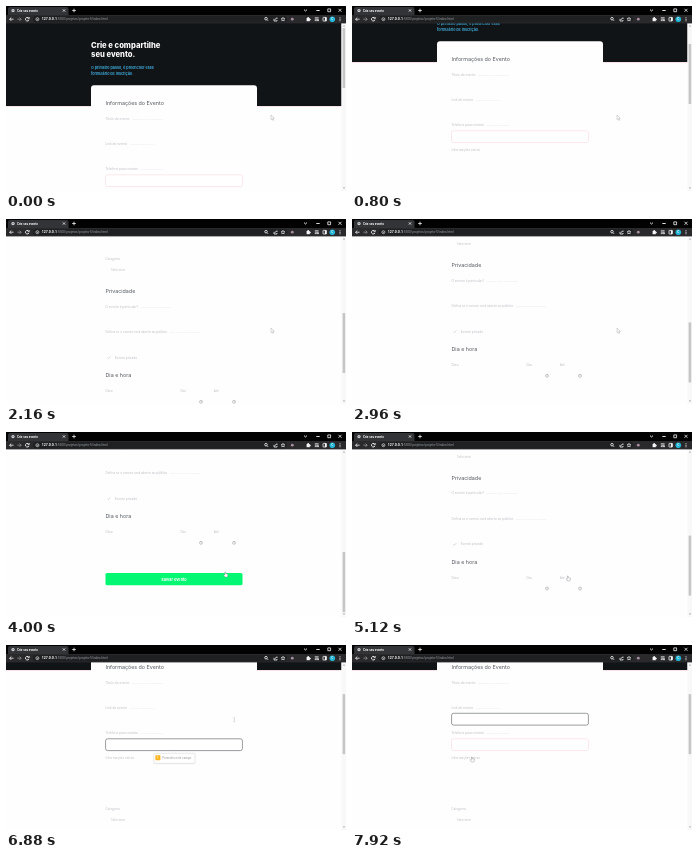
These frames come from a looping animation (340 px wide and 185 px high, 8000 ms). An HTML page with a canvas:

```html
<!DOCTYPE html>
<html lang="pt-BR">
<head>
<meta charset="utf-8">
<title>Crie seu evento</title>
<style>
html, body { margin: 0; width: 100%; height: 100%; overflow: hidden; background: #fff; }
canvas { display: block; width: 340px; height: 185px; }
</style>
</head>
<body>
<canvas id="stage"></canvas>
<script>
const W = 340, H = 185, LOOP = 8000, STEP = 80;
const PAGE_TOP = 17.4, PAGE_RIGHT = 335.5;
const UI = 'Roboto, "Open Sans", sans-serif';
const BODY = '"Open Sans", Inter, sans-serif';
const HEAD = 'Inter, "Open Sans", sans-serif';

const canvas = document.getElementById('stage');
const ctx = canvas.getContext('2d');
const dpr = window.devicePixelRatio || 1;
canvas.width = W * dpr;
canvas.height = H * dpr;

// [time, value...]
const scrollKeys = [
  [480, 0], [800, 44], [1040, 75], [1280, 75], [1600, 106], [2160, 199],
  [2720, 199], [2960, 225], [3360, 271], [4720, 271], [6240, 97.5], [6480, 75]
];
const pointerKeys = [
  [3680, 265, 109], [4000, 218.5, 140], [4480, 215, 144], [5120, 215, 144],
  [5840, 229, 77], [6640, 229, 77], [6960, 228, 74], [7520, 228, 74], [7920, 119, 112]
];

function track(keys, t) {
  if (t <= keys[0][0]) return keys[0].slice(1);
  for (let i = 1; i < keys.length; i++) {
    const a = keys[i - 1], b = keys[i];
    if (t <= b[0]) {
      const k = (t - a[0]) / (b[0] - a[0]);
      return a.slice(1).map((v, j) => v + (b[j + 1] - v) * k);
    }
  }
  return keys[keys.length - 1].slice(1);
}

function rect(x, y, w, h, color) {
  ctx.fillStyle = color;
  ctx.fillRect(x, y, w, h);
}

function round(x, y, w, h, r, fill, stroke, line = 0.7) {
  ctx.beginPath();
  ctx.roundRect(x, y, w, h, r);
  if (fill) { ctx.fillStyle = fill; ctx.fill(); }
  if (stroke) { ctx.strokeStyle = stroke; ctx.lineWidth = line; ctx.stroke(); }
}

// y is the vertical middle of the line; returns the end of the text
function text(str, x, y, size, color, family, weight = 400, align = 'left') {
  ctx.font = `${weight} ${size}px ${family}`;
  ctx.textAlign = align;
  ctx.textBaseline = 'middle';
  ctx.fillStyle = color;
  ctx.fillText(str, x, y);
  return x + ctx.measureText(str).width;
}

function path(points, color, line = 0.8, fill) {
  ctx.beginPath();
  points.forEach(([x, y], i) => i ? ctx.lineTo(x, y) : ctx.moveTo(x, y));
  if (fill) { ctx.closePath(); ctx.fillStyle = fill; ctx.fill(); }
  if (color) { ctx.strokeStyle = color; ctx.lineWidth = line; ctx.stroke(); }
}

function circle(x, y, r, fill, stroke, line = 0.6, from = 0, to = Math.PI * 2) {
  ctx.beginPath();
  ctx.arc(x, y, r, from, to);
  if (fill) { ctx.fillStyle = fill; ctx.fill(); }
  if (stroke) { ctx.strokeStyle = stroke; ctx.lineWidth = line; ctx.stroke(); }
}

function cross(x, y, r, color) {
  path([[x - r, y - r], [x + r, y + r]], color);
  path([[x - r, y + r], [x + r, y - r]], color);
}

function drawBrowser() {
  const ink = '#f4f5f6', dim = '#8d9094';
  rect(0, 0, W, 9, '#020203');
  round(2, 1, 60.5, 10, [2, 2, 0, 0], '#333437');
  rect(0, 9, W, PAGE_TOP - 9, '#2a2a2d');

  circle(7, 4.6, 1.7, '#d5d8db');
  path([[5.4, 4.6], [8.6, 4.6]], '#55585c', 0.5);
  text('Crie seu evento', 11, 4.8, 3, '#fff', UI, 700);
  cross(58, 4.5, 1.1, ink);
  path([[66.2, 4.5], [69.8, 4.5]], ink);
  path([[68, 2.7], [68, 6.3]], ink);

  path([[298, 3.6], [299.5, 5], [301, 3.6]], ink, 0.9);
  path([[310.3, 4.5], [313.7, 4.5]], ink, 0.9);
  round(321.8, 2.9, 2.8, 2.8, 0, null, ink, 0.8);
  cross(334, 4.3, 1.5, ink);

  path([[7.6, 13.2], [3.6, 13.2]], ink);
  path([[5.3, 11.5], [3.6, 13.2], [5.3, 14.9]], ink);
  path([[11.4, 13.2], [15.2, 13.2]], dim);
  path([[13.5, 11.5], [15.2, 13.2], [13.5, 14.9]], dim);
  circle(21.3, 13.2, 1.8, null, ink, 0.9, 0.4, 5.6);
  path([[23.2, 11], [23.2, 12.7], [21.6, 12.7]], ink);

  round(27, 10.1, 254, 6.3, 3.15, '#1f2022');
  circle(31.4, 13.2, 1.5, null, ink, 0.6);
  path([[31.4, 12.8], [31.4, 14]], ink, 0.6);
  const end = text('127.0.0.1', 35.8, 13.4, 3.5, '#fff', UI, 700);
  text(':5500/projetos/projeto-5/index.html', end, 13.4, 3.2, '#9aa0a6', UI);

  circle(260, 12.7, 1.3, null, ink, 0.8);
  path([[260.9, 13.6], [262.1, 14.8]], ink);
  path([[268, 12.8], [268, 15], [271, 15], [271, 14]], ink);
  path([[269, 13.8], [270, 12.2], [271.7, 12.2]], ink);
  const star = Array.from({ length: 11 }, (_, i) => {
    const a = i * Math.PI / 5 - Math.PI / 2, r = i % 2 ? 0.9 : 2.1;
    return [277 + r * Math.cos(a), 13.3 + r * Math.sin(a)];
  });
  path(star, ink, 0.6);
  circle(286.3, 13.2, 1.4, '#a88ea0');

  rect(300.6, 12, 3.2, 3.2, ink);
  circle(302.2, 11.8, 0.9, ink);
  circle(304, 13.6, 0.8, ink);
  for (let i = 0; i < 3; i++) path([[308.8, 11.8 + i * 1.4], [i < 2 ? 312.6 : 310.8, 11.8 + i * 1.4]], ink);
  circle(312, 14.4, 0.8, ink);
  round(317, 11.4, 3.4, 3.6, 0.4, null, ink, 0.8);
  rect(318.9, 11.4, 1.5, 3.6, ink);
  circle(326.3, 13.2, 2.8, '#22b3d2');
  text('C', 326.3, 13.4, 3.2, '#e9fbff', UI, 500, 'center');
  for (let i = -1; i < 2; i++) circle(334, 13.2 + i * 1.5, 0.55, ink);
}

function label(str, y, hint, x = 99.5) {
  const end = text(str, x, y, 3.2, '#bcbcc4', BODY);
  if (hint) text(hint, end + 2.5, y, 2.5, '#e2e2e7', BODY);
}

function heading(str, y) {
  text(str, 99.5, y, 5.35, '#50555d', HEAD, 400);
}

function field(y, focused) {
  round(99.6, y, 136.8, 11.8, 2, '#fff', focused ? '#707276' : '#f9dde3', 0.7);
}

function clock(x, y) {
  circle(x, y, 1.5, null, '#a6a6ab', 0.6);
  path([[x, y - 0.9], [x, y], [x + 0.7, y]], '#a6a6ab', 0.5);
}

function bubble(y) {
  ctx.save();
  ctx.shadowColor = 'rgba(0,0,0,.14)';
  ctx.shadowBlur = 1.2 * dpr;
  ctx.shadowOffsetY = 0.4 * dpr;
  round(148, y, 41, 10, 1, '#fff', '#e2e2e2', 0.4);
  ctx.restore();
  path([[166, y + 0.2], [168, y - 1.8], [170, y + 0.2]], '#e2e2e2', 0.4, '#fff');
  round(149.4, y + 2, 5, 5, 0.6, '#fab41e');
  text('!', 151.9, y + 4.7, 4.2, '#fff', UI, 700, 'center');
  text('Preencha este campo.', 156.3, y + 5.1, 3, '#9a9a9a', UI);
}

function drawPage(t, scroll) {
  ctx.save();
  ctx.beginPath();
  ctx.rect(0, 17, W, H - 17);
  ctx.clip();
  rect(0, 17, W, H, '#fefefe');
  ctx.translate(0, -scroll);

  rect(0, 17, PAGE_RIGHT, 83, '#111416');
  rect(0, 100, PAGE_RIGHT, 1, '#f8e2e8');
  text('Crie e compartilhe', 85, 39.4, 7.65, '#fff', HEAD, 800);
  text('seu evento.', 85, 48.8, 7.65, '#fff', HEAD, 800);
  text('O primeiro passo, é preencher esse', 85, 62, 3.68, '#42b9ee', HEAD, 600);
  text('formulário de inscrição.', 85, 68, 3.68, '#42b9ee', HEAD, 600);
  round(85, 79.2, 166, 380, [3, 3, 0, 0], '#fefefe');

  heading('Informações do Evento', 97.2);
  label('Título do evento', 113.2, '(máximo de 50 caracteres)');
  label('Link do evento', 138.4, '(comece com https://)');
  if (t >= 7440) field(143.3, true);
  label('Telefone para contato', 163.4, '(somente números)');
  field(168.8, t >= 4800 && t < 7440);
  label('Informações extras', 188.5);
  label('Categoria', 239.3);
  label('Selecione', 250.2, '', 105);

  heading('Privacidade', 271.3);
  label('O evento é particular?', 287, '(marque uma das opções)');
  label('Defina se o evento será aberto ao público', 312.2, '(escolha uma das opções)');
  path([[101.4, 337.6], [102.4, 338.6], [104.4, 336.4]], '#c2c2c8', 0.6);
  label('Evento privado', 337.7, '', 108.8);

  heading('Dia e hora', 355.5);
  label('Data', 371.1);
  label('Das', 371.1, '', 174.5);
  label('Até', 371.1, '', 207.8);
  clock(195, 381.8);
  clock(228, 381.8);
  round(99.5, 412, 137, 12.3, 1.6, '#04f772');
  text('Salvar evento', 168, 418.4, 3.8, '#fff', HEAD, 700, 'center');

  if (t >= 4800 && t < 7440) bubble(183.2);
  ctx.restore();
}

function drawScrollbar(scroll) {
  rect(PAGE_RIGHT, 17, W - PAGE_RIGHT, H - 17, '#f8f8f8');
  rect(336.6, 22 + scroll * 0.362, 2.6, 60, '#c6c6c6');
  path([[337, 20.4], [338, 19.2], [339, 20.4]], null, 0, '#8b8b8b');
  path([[337, 181.6], [338, 182.8], [339, 181.6]], null, 0, '#8b8b8b');
}

function drawPointer(t) {
  const [x, y] = track(pointerKeys, t);
  ctx.save();
  ctx.translate(x, y);
  if ((t >= 4000 && t < 5200) || t >= 7840) {
    path([[0.4, 0], [1.2, 0], [1.3, 1.7], [3.4, 2.2], [3.2, 4.2], [2.7, 5], [0.6, 5],
      [-0.8, 3.2], [-0.3, 2.7], [0.3, 3.1]], '#7c7c82', 0.4, '#fff');
  } else if (t >= 5840 && t < 7600) {
    path([[0, -2], [0, 2]], '#b4b4b8', 0.5);
    path([[-0.8, -2], [0.8, -2]], '#b4b4b8', 0.4);
    path([[-0.8, 2], [0.8, 2]], '#b4b4b8', 0.4);
  } else {
    path([[0, 0], [0, 4.6], [1.1, 3.7], [1.9, 5.4], [2.6, 5.1], [1.9, 3.4], [3.3, 3.3], [0, 0]],
      '#9c9ca1', 0.4, '#fff');
  }
  ctx.restore();
}

function draw(now) {
  const t = Math.floor((now % LOOP) / STEP) * STEP;
  const [scroll] = track(scrollKeys, t);
  ctx.setTransform(dpr, 0, 0, dpr, 0, 0);
  drawPage(t, scroll);
  drawScrollbar(scroll);
  drawBrowser();
  drawPointer(t);
}

let start;
function tick(now) {
  if (start === undefined) start = now;
  draw(now - start);
  requestAnimationFrame(tick);
}
draw(0);
requestAnimationFrame(tick);
</script>
</body>
</html>
```
